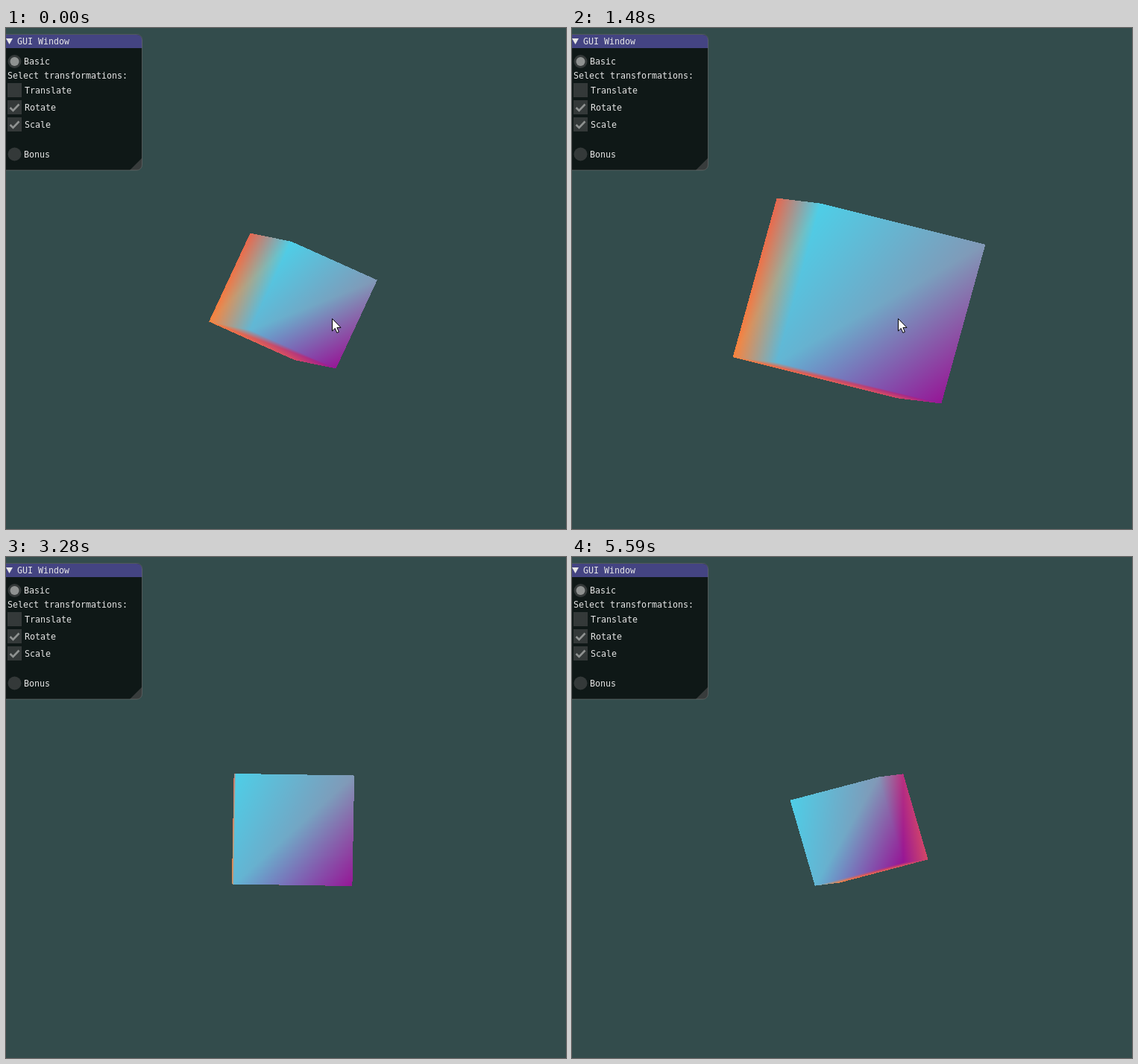
Write an HTML page with a canvas that moves like this. It is 751x673 px and loops after 5690 ms.

```html
<!DOCTYPE html>
<html lang="en">
<head>
<meta charset="utf-8">
<title>Rotating cube</title>
<style>
  html, body { margin: 0; width: 100%; height: 100%; overflow: hidden; background: #334c4c; }
  canvas, svg { position: absolute; left: 0; top: 0; display: block; }
  text { font: 11.63px "DejaVu Sans Mono", "Noto Sans Mono", monospace; fill: #e6e6e6; white-space: pre; }
  .frame { fill: #343939; }
  .mark { fill: #8f9291; }
  .tick { fill: none; stroke: #8f9291; stroke-width: 2.6; }
</style>
</head>
<body>
<canvas id="stage" width="751" height="673"></canvas>
<svg width="751" height="673" viewBox="0 0 751 673">
  <path d="M-5 8.5H175.5a7 7 0 0 1 7 7V184a7 7 0 0 1-7 7H-5z" fill="#0f1817"/>
  <path d="M-5 9H175.5a7 7 0 0 1 7 7V27H-5z" fill="#444482"/>
  <path d="M166 191L182.5 174.500V184a7 7 0 0 1-7 7z" fill="#383c3c"/>
  <path d="M-5 8.500H175.500a7 7 0 0 1 7 7V184a7 7 0 0 1-7 7H-5z" fill="none" stroke="#808080" stroke-opacity=".5"/>
  <path d="M0 14H9L4.500 22z" fill="#e6e6e6"/>
  <text x="15" y="22">GUI Window</text>

  <circle class="frame" cx="11.500" cy="45" r="9"/>
  <circle class="mark" cx="11.500" cy="45" r="6"/>
  <text x="24" y="49">Basic</text>
  <text x="2" y="68">Select transformations:</text>

  <rect class="frame" x="2" y="74" width="19" height="19"/>
  <text x="25" y="88">Translate</text>
  <rect class="frame" x="2" y="97" width="19" height="19"/>
  <path class="tick" d="M5.500 107L9.500 111L17.500 102.500"/>
  <text x="25" y="111">Rotate</text>
  <rect class="frame" x="2" y="120" width="19" height="19"/>
  <path class="tick" d="M5.500 130L9.500 134L17.500 125.500"/>
  <text x="25" y="134">Scale</text>

  <circle class="frame" cx="11.500" cy="169.500" r="9"/>
  <text x="24" y="174">Bonus</text>

  <path id="cursor" d="M.5.5V17L4.300 13.400L6.800 19.400L9.400 18.300L6.900 12.400H12z" fill="#fff" stroke="#000"/>
</svg>
<script>
const LOOP = 5690;
const W = 751, H = 673, CX = 385, CY = 366.5;
const SIDE = 148.5, STRETCH = 1.069;

// Start of each displayed step, in hundredths of a second
const STEPS = [
  0, 15, 30, 45, 60, 75, 90, 105,
  120, 135, 149, 164, 178, 193, 207, 223,
  238, 253, 268, 283, 298, 313, 328, 342,
  355, 369, 383, 397, 412, 427, 441, 456,
  469, 485, 500, 517, 531, 545, 559
].map(n => n * 10);

// Pointer tip: [from ms, x, y]
const POINTER = [
  [0, 437, 390], [2070, 441, 396], [2230, 445, 400],
  [2380, 465, 424], [2530, 545, 510], [2680, 662, 639], [2830, -50, -50]
];

// Corners: position (x right, y up, z towards the viewer) and colour
const CORNERS = {
  A: { p: [-1, 1, 1], c: [78, 206, 231] },
  B: { p: [1, 1, 1], c: [130, 152, 182] },
  C: { p: [1, -1, 1], c: [150, 22, 150] },
  D: { p: [-1, -1, 1], c: [98, 182, 212] },
  E: { p: [-1, 1, -1], c: [232, 102, 78] },
  F: { p: [-1, -1, -1], c: [250, 130, 60] },
  G: { p: [1, 1, -1], c: [186, 48, 126] },
  H: { p: [1, -1, -1], c: [212, 72, 102] }
};

// Clockwise on screen when facing the viewer
const TRIANGLES = ["ABD", "BCD", "EAF", "ADF", "DCF", "CHF", "BGC", "GHC"];

const ctx = document.getElementById("stage").getContext("2d");
const cursor = document.getElementById("cursor");

function project([x, y, z], angle, size) {
  const c = Math.cos(angle), s = Math.sin(angle) * Math.SQRT1_2;
  const px = x * c + (y + z) * s;
  const py = -x * s + y * (1 + c) / 2 - z * (1 - c) / 2;
  return [CX + px * size * STRETCH / 2, CY - py * size / 2];
}

function side(a, b, x, y) {
  return (b[0] - a[0]) * (y - a[1]) - (b[1] - a[1]) * (x - a[0]);
}

function fillTriangle(image, pts, cols) {
  const [a, b, c] = pts;
  const area = side(a, b, c[0], c[1]);
  if (area <= 0) return;
  const xs = pts.map(p => p[0]), ys = pts.map(p => p[1]);
  const x0 = Math.floor(Math.min(...xs)), x1 = Math.ceil(Math.max(...xs));
  const y0 = Math.floor(Math.min(...ys)), y1 = Math.ceil(Math.max(...ys));
  for (let y = y0; y <= y1; y++) {
    for (let x = x0; x <= x1; x++) {
      const u = side(b, c, x + 0.5, y + 0.5) / area;
      const v = side(c, a, x + 0.5, y + 0.5) / area;
      const w = 1 - u - v;
      if (u < -1e-9 || v < -1e-9 || w < -1e-9) continue;
      const i = (y * W + x) * 4;
      for (let k = 0; k < 3; k++) {
        image.data[i + k] = cols[0][k] * u + cols[1][k] * v + cols[2][k] * w;
      }
      image.data[i + 3] = 255;
    }
  }
}

function draw(ms) {
  const t = ms / 1000;
  const angle = (34.2 - 10 * t) * Math.PI / 180;
  const size = SIDE * (0.5 + Math.abs(Math.cos(t - 1.185)));
  const image = ctx.createImageData(W, H);
  for (const names of TRIANGLES) {
    const corners = [...names].map(n => CORNERS[n]);
    fillTriangle(image, corners.map(k => project(k.p, angle, size)), corners.map(k => k.c));
  }
  ctx.putImageData(image, 0, 0);
  const [, x, y] = POINTER.findLast(k => k[0] <= ms);
  cursor.setAttribute("transform", `translate(${x} ${y})`);
}

const start = performance.now();
let shown = -1;

function tick() {
  const time = (performance.now() - start) % LOOP;
  const step = STEPS.findLast(s => s <= time);
  if (step !== shown) draw(shown = step);
  requestAnimationFrame(tick);
}
tick();
</script>
</body>
</html>
```
